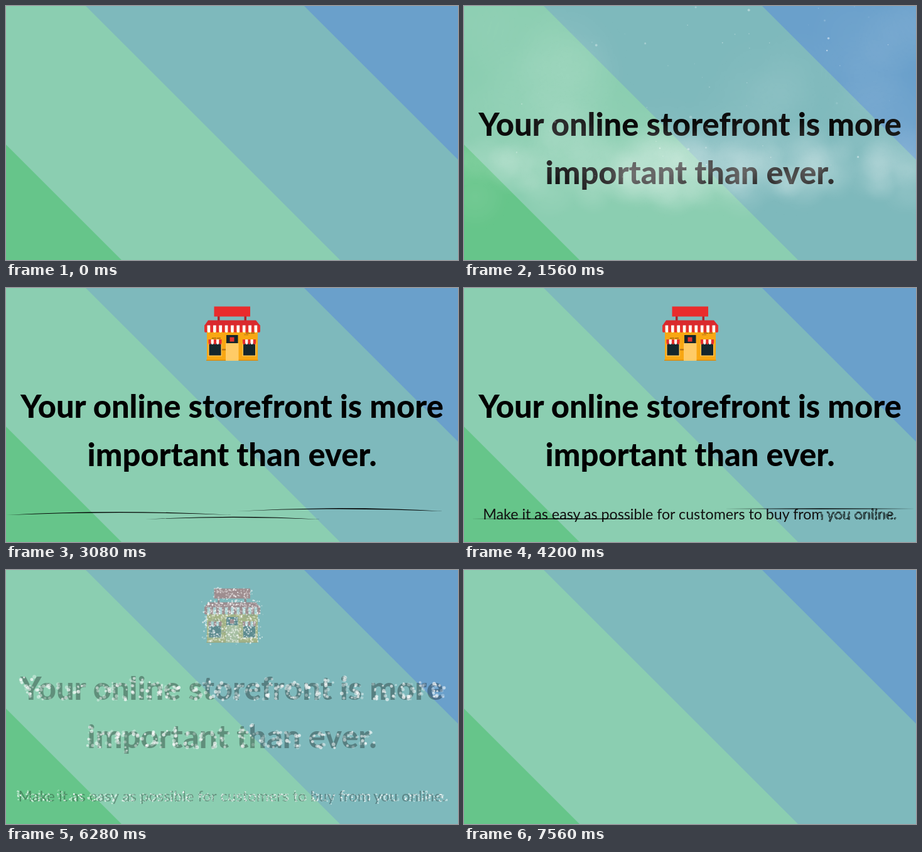
An HTML page with a canvas for the animation above (7720 ms loop, 720 px wide and 405 px high).

```html
<!DOCTYPE html>
<html lang="en">
<head>
<meta charset="utf-8">
<title>Storefront</title>
<style>
  html, body { margin: 0; width: 100%; height: 100%; overflow: hidden; background: #7eb9bc; }
  svg, canvas { position: absolute; left: 0; top: 0; width: 720px; height: 405px; display: block; }
  text { font-family: Lato, "Open Sans", sans-serif; }
  #title { font-weight: 800; }
</style>
</head>
<body>
<svg viewBox="0 0 720 405">
  <defs>
    <clipPath id="drawnClip"><rect id="drawn" x="-40" y="330" width="0" height="70"/></clipPath>
    <clipPath id="sketchClip"><rect id="sketch" x="0" y="330" width="0" height="70"/></clipPath>
  </defs>
  <rect width="720" height="405" fill="#7eb9bc"/>
  <path d="M475 0H720V245Z" fill="#6aa0cb"/>
  <path d="M0 0H127L532 405H0Z" fill="#8bceb1"/>
  <path d="M0 221L184 405H0Z" fill="#66c58a"/>
  <g id="content">
    <g id="store"></g>
    <g id="title"></g>
    <g id="subtitle">
      <g clip-path="url(#drawnClip)"><text id="subFill" fill="#111"></text></g>
      <g clip-path="url(#sketchClip)" aria-hidden="true">
        <text id="subLine" fill="#000" fill-opacity=".3" stroke="#000" stroke-width=".9" stroke-dasharray="11 3"></text>
      </g>
    </g>
    <path id="strands" fill="#000"/>
  </g>
</svg>
<canvas width="720" height="405"></canvas>
<script>
const LOOP = 7720, STEP = 40;
const $ = id => document.getElementById(id);
const clamp = (v, a = 0, b = 1) => Math.min(b, Math.max(a, v));
const span = (t, a, b) => clamp((t - a) / (b - a));
const ctx = document.querySelector('canvas').getContext('2d');

function seeded(seed) {
  return () => {
    seed = seed + 0x6D2B79F5 | 0;
    let n = Math.imul(seed ^ seed >>> 15, 1 | seed);
    n = n + Math.imul(n ^ n >>> 7, 61 | n) ^ n;
    return ((n ^ n >>> 14) >>> 0) / 4294967296;
  };
}
const rand = seeded(41);
const between = (a, b) => a + (b - a) * rand();

// ---- text ----
const FAMILY = 'Lato, "Open Sans", sans-serif';
const SUBTITLE = 'Make it as easy as possible for customers to buy from you online.';
const TITLE = ['Your online storefront is more', 'important than ever.'];

function sizeFor(text, weight, width) {
  ctx.font = `${weight} 100px ${FAMILY}`;
  return 100 * width / ctx.measureText(text).width;
}
const titleSize = sizeFor(TITLE[0], 800, 675);
const subSize = sizeFor(SUBTITLE, 400, 683);
const titleLines = TITLE.map((text, i) => ({ text, y: 207 + 77 * i, size: titleSize, weight: 800 }));
const subLine = { text: SUBTITLE, y: 369, size: subSize, weight: 400 };

$('title').innerHTML = titleLines.map(l =>
  `<text x="360" y="${l.y}" font-size="${l.size}" text-anchor="middle">${l.text}</text>`).join('');
for (const id of ['subFill', 'subLine']) {
  const el = $(id);
  el.textContent = SUBTITLE;
  el.setAttribute('x', 360);
  el.setAttribute('y', subLine.y);
  el.setAttribute('font-size', subSize);
  el.setAttribute('text-anchor', 'middle');
}

// ---- shop ----
const box = (x, y, w, h, fill) => `<rect x="${x}" y="${y}" width="${w}" height="${h}" fill="${fill}"/>`;

function awning(x, y, width, height, count) {
  const w = width / count, r = w / 2;
  return Array.from({ length: count }, (_, i) =>
    `<path d="M${x + i * w} ${y}h${w}v${height - r}a${r} ${r} 0 0 1 ${-w} 0z" fill="${i % 2 ? '#fff' : '#e5302f'}"/>`).join('');
}

function drawShop() {
  const brick = (x, y) => box(x, y, 7, 2, '#b87513') + box(x + 8, y, 6, 2, '#b87513') + box(x - 3, y + 2.7, 7, 1.6, '#c98318');
  const shopWindow = x => box(x - 1.5, 87, 22, 22, '#ffc24d') + box(x, 87, 19, 20.5, '#14262c') + awning(x - 1, 82, 21, 8, 5);
  return box(337, 44, 3.5, 9, '#a8262b') + box(379.5, 44, 3.5, 9, '#a8262b') +
    box(331.5, 29.5, 57.5, 16, '#e92c2c') +
    box(320, 62, 81, 53, '#f8a713') +
    brick(328, 79) + brick(382, 71) + box(343, 97, 7, 2.5, '#b87513') +
    '<path d="M322 51.500H398L405 60H316Z" fill="#d9292d"/>' +
    awning(316, 59.5, 89, 11.5, 19) +
    box(351, 75, 18.500, 13, '#14262c') + box(356.5, 78.5, 7, 7, '#e5302f') +
    box(350, 88, 20.5, 28, '#ffcb66') +
    shopWindow(323.5) + shopWindow(378) +
    box(319, 114.5, 31, 1.5, '#d98b12') + box(370.5, 114.5, 31, 1.5, '#d98b12');
}
$('store').innerHTML = drawShop();

function storeOffset(t) {
  if (t < 2330) return -118 * (1 - span(t, 2040, 2330) ** 2);
  let start = 2330;
  for (const [height, length] of [[29, 290], [7, 145], [2, 75]]) {
    if (t < start + length) {
      const u = (t - start) / length;
      return -4 * height * u * (1 - u);
    }
    start += length;
  }
  return 0;
}

// ---- dust of the landing title ----
const LANDING = 720;
const puffs = [];
for (let i = 0; i < 45; i++) {
  const x = between(-20, 740), edge = Math.abs(x - 360) / 360;
  puffs.push({ x, y: 285, r: between(45, 85), rise: between(40, 330) * (.25 + .75 * edge), a: .2, drift: between(-40, 40) });
}
for (let i = 0; i < 115; i++) {
  puffs.push({ x: between(-20, 740), y: between(272, 304), r: between(18, 42), rise: between(-10, 65), a: .42, drift: between(-30, 30) });
}
const debris = Array.from({ length: 60 }, () => ({
  x: between(0, 720), height: between(60, 335), r: .6 + 2.3 * rand() ** 3,
  a: between(.35, .8), drift: between(-50, 50), life: between(900, 1500)
}));

function dot(x, y, r, alpha) {
  ctx.globalAlpha = alpha;
  ctx.beginPath();
  ctx.arc(x, y, r, 0, 7);
  ctx.fill();
}

const puffSprite = document.createElement('canvas');
puffSprite.width = puffSprite.height = 128;
{
  const c = puffSprite.getContext('2d');
  const g = c.createRadialGradient(64, 64, 0, 64, 64, 64);
  [[0, 1], [.5, .55], [.8, .15], [1, 0]].forEach(([at, a]) => g.addColorStop(at, `rgba(255,255,255,${a})`));
  c.fillStyle = g;
  c.fillRect(0, 0, 128, 128);
}

function drawDust(t) {
  const age = t - LANDING;
  if (age < 0 || age > 1500) return;
  const spread = 1 - Math.exp(-age / 250);
  const fade = Math.min(1, age / 70) * (1 - span(age, 160, 1200)) ** 1.6;
  for (const p of puffs) {
    const r = p.r * (.7 + .7 * spread);
    ctx.globalAlpha = p.a * fade;
    ctx.drawImage(puffSprite, p.x + p.drift * spread - r, p.y - p.rise * spread - r, 2 * r, 2 * r);
  }
  const thrown = 1 - Math.exp(-age / 75);
  for (const d of debris) {
    const y = 285 - d.height * thrown + 70 * (age / 1000) ** 2;
    dot(d.x + d.drift * age / 1000, y, d.r, d.a * (1 - span(age, d.life * .4, d.life)));
  }
}

// ---- sparkling dissolve ----
const sampler = document.createElement('canvas');
sampler.width = 720;
sampler.height = 405;

function sparks(paint, count, [x0, y0, x1, y1], look) {
  const c = sampler.getContext('2d', { willReadFrequently: true });
  c.clearRect(0, 0, 720, 405);
  paint(c);
  const alpha = c.getImageData(0, 0, 720, 405).data;
  const list = [];
  for (let tries = 0; list.length < count && tries < 90000; tries++) {
    const x = between(x0, x1), y = between(y0, y1);
    if (alpha[4 * (Math.floor(y) * 720 + Math.floor(x)) + 3] < 120) continue;
    const angle = between(0, 6.283), push = look.jitter * rand();
    list.push({
      x, y, dx: Math.cos(angle) * push + (x - 360) * look.grow, dy: Math.sin(angle) * push - look.lift * rand(),
      r: between(look.r[0], look.r[1]), a: between(.3, 1), end: between(.6, .98), phase: between(0, 6.283)
    });
  }
  return list;
}

const paintText = lines => c => {
  c.textAlign = 'center';
  for (const l of lines) {
    c.font = `${l.weight} ${l.size}px ${FAMILY}`;
    c.fillText(l.text, 360, l.y);
  }
};
function paintShop(c) {
  c.fillRect(331, 29, 58, 17);
  c.fillRect(318, 50, 85, 66);
}
const glitter = [
  ...sparks(paintText(titleLines), 680, [5, 160, 715, 300], { jitter: 9, grow: .04, lift: 4, r: [1.5, 3.1] }),
  ...sparks(paintText([subLine]), 1150, [5, 345, 715, 380], { jitter: 3.4, grow: .04, lift: 1, r: [.7, 1.3] }),
  ...sparks(paintShop, 720, [315, 28, 406, 117], { jitter: 25, grow: .12, lift: 4, r: [.8, 1.6] })
];

function drawGlitter(t) {
  const k = (t - 6100) / 1440;
  if (k <= 0 || k >= 1) return;
  const d = 1 - (1 - k) ** 2, appear = span(k, 0, .16);
  for (const p of glitter) {
    const a = appear * p.a * (1 - span(k, p.end - .35, p.end)) * (.85 + .15 * Math.sin(p.phase + 14 * k));
    if (a > .01) dot(p.x + p.dx * d, p.y + p.dy * d, p.r * (1 - .3 * k), a);
  }
}

// ---- subtitle drawn by flying strokes ----
const STROKES = [
  { y: 368, x: 10, length: 300, dir: 1, end: 4440 },
  { y: 352, x: 413, length: 310, dir: -1, end: 4440 },
  { y: 362, x: 300, length: 360, dir: 1, end: 4000 },
  { y: 356, x: 120, length: 330, dir: -1, end: 3880 },
  { y: 369, x: 380, length: 280, dir: 1, end: 3680 }
];

function strokePath(s, t) {
  const lead = (s.end - 240 - t) / 1000;
  const length = s.length * clamp((s.end - t) / 240);
  if (t < 2920 || !length) return '';
  const x = s.x - s.dir * 440 * lead + (s.dir > 0 ? s.length - length : 0);
  const bend = Math.max(0, lead) * 34 * Math.sin(s.y + 3 * lead);
  const mid = x + length / 2;
  return `M${x} ${s.y}Q${mid} ${s.y + bend - 1.3} ${x + length} ${s.y}Q${mid} ${s.y + bend + 1.3} ${x} ${s.y}Z`;
}

function subtitleScale(t) {
  if (t < 4920) return .91 + .118 * (1 - Math.cos(Math.PI * span(t, 3480, 4920))) / 2;
  return 1 + .028 * (1 - span(t, 4920, 5480) ** 2);
}

function drawSubtitle(t) {
  const edge = 575 * Math.max(0, t - 3300) / 900;
  const s = subtitleScale(t);
  $('subtitle').setAttribute('transform', `translate(360 361) scale(${s}) translate(-360 -361)`);
  $('drawn').setAttribute('width', t < 3300 ? 0 : 40 + (t > 4440 ? 740 : edge));
  $('sketch').setAttribute('x', edge);
  $('sketch').setAttribute('width', t < 3200 || t > 4480 ? 0 : 135);
  $('subLine').setAttribute('stroke-dashoffset', t / 40);
  $('strands').setAttribute('d', STROKES.map(k => strokePath(k, t)).join(''));
}

function render(t) {
  const fall = -300 * (1 - span(t, 500, LANDING) ** 2);
  $('title').setAttribute('transform', `translate(0 ${fall})`);
  $('title').setAttribute('visibility', t < 520 ? 'hidden' : 'visible');
  $('store').setAttribute('transform', `translate(0 ${storeOffset(t)})`);
  $('content').setAttribute('opacity', 1 - span(t, 6100, 6360));
  drawSubtitle(t);

  ctx.clearRect(0, 0, 720, 405);
  ctx.fillStyle = '#fff';
  drawDust(t);
  drawGlitter(t);
  ctx.globalAlpha = 1;
}

const began = performance.now();
function tick() {
  const t = (performance.now() - began) % LOOP;
  render(Math.floor(t / STEP) * STEP);
  requestAnimationFrame(tick);
}
tick();
</script>
</body>
</html>
```
